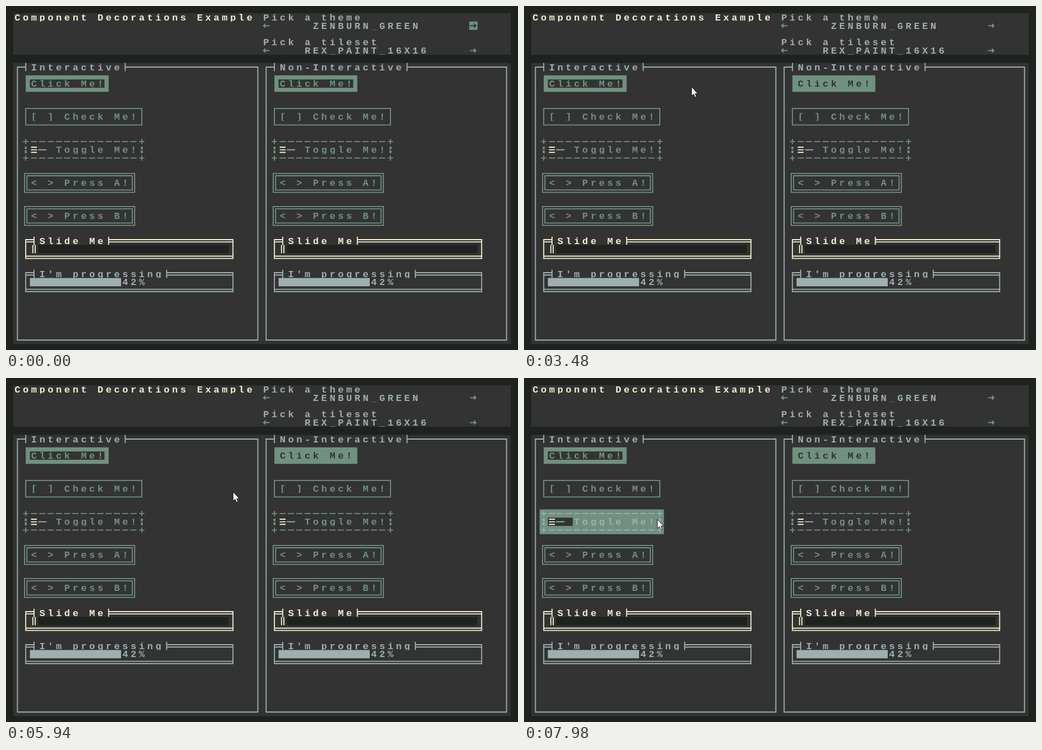
An HTML page that plays this animation: 912x614 px, repeating every 8000 ms.

```html
<!DOCTYPE html>
<html lang="en">
<head>
<meta charset="utf-8">
<title>Component Decorations Example</title>
<style>
  html, body { margin: 0; width: 100%; height: 100%; overflow: hidden; background: #1e2320; }
  svg { display: block; }
  text { font: bold 17px "Liberation Mono", "DejaVu Sans Mono", monospace; letter-spacing: 4.566px; }
</style>
</head>
<body>
<svg id="stage" width="912" height="614" viewBox="0 0 912 614"></svg>
<script>
const LOOP = 8000, STEP = 30;
const CELL = 14.766, ORIGIN = 13, LINE = 1.85, GAP = 2.1;
const BG = '#333333', DARK = '#1e2320', GREEN = '#709080', GRAY = '#9fafaf', CREAM = '#f0efd0';
const PRESS = 2460, RELEASE = 2580;

const stage = document.getElementById('stage');
const at = n => ORIGIN + n * CELL;
const mid = n => at(n + 0.5);

function el(tag, attrs, parent = stage) {
  const node = document.createElementNS('http://www.w3.org/2000/svg', tag);
  for (const key in attrs) node.setAttribute(key, attrs[key]);
  return parent.appendChild(node);
}

const fill = (node, color) => node.setAttribute('fill', color);
const stroke = (node, color) => node.setAttribute('stroke', color);

function block(col, row, w, h, color) {
  return el('rect', { x: at(col), y: at(row), width: w * CELL, height: h * CELL, fill: color });
}

// One line of text, cut off at the edges of its row.
function label(str, col, row, color) {
  const clip = el('svg', { x: at(col), y: at(row), width: str.length * CELL, height: CELL });
  const node = el('text', { x: 2.28, y: 12.9, fill: color }, clip);
  node.textContent = str;
  return node;
}

function path(d, color, width = LINE) {
  return el('path', { d, fill: 'none', stroke: color, 'stroke-width': width });
}

const boxPath = (x0, y0, x1, y1) => `M${x0} ${y0}H${x1}V${y1}H${x0}Z`;

function singleBox(c0, r0, c1, r1, color) {
  return path(boxPath(mid(c0), mid(r0), mid(c1), mid(r1)), color);
}

function doubleBox(c0, r0, c1, r1, color) {
  const grown = g => boxPath(mid(c0) - g, mid(r0) - g, mid(c1) + g, mid(r1) + g);
  path(grown(GAP) + grown(-GAP), color);
}

// Frame with a bracketed title in its top edge; offsets give its horizontal lines.
function titledBox(title, c0, r0, c1, r1, offsets, color) {
  const open = offsets.length > 1 ? c0 + 1 : c0 + 1;
  const close = open + title.length + 1;
  const top = mid(r0), bottom = mid(r1), last = offsets[offsets.length - 1];
  let d = `M${mid(open)} ${at(r0)}v${CELL}M${mid(close)} ${at(r0)}v${CELL}`;
  for (const x of [mid(c0), mid(c1)])
    d += `M${x} ${top + offsets[0] - LINE / 2}V${bottom + last + LINE / 2}`;
  for (const o of offsets)
    d += `M${mid(c0)} ${top + o}H${mid(open)}M${mid(close)} ${top + o}H${mid(c1)}` +
         `M${mid(c0)} ${bottom + o}H${mid(c1)}`;
  path(d, color);
  label(title, open + 1, r0, color);
}

function arrow(col, row, dir, color) {
  return el('path', {
    d: 'M6 0L1 -4.6V-1H-6V1H1V4.6Z',
    transform: `translate(${mid(col)} ${mid(row)}) scale(${dir} 1)`,
    fill: color
  });
}

const inside = (p, col, row, w, h) =>
  p && p.x >= at(col) && p.x < at(col + w) && p.y >= at(row) && p.y < at(row + h);

function clickButton(c, full) {
  const frame = block(c + 1.5, 7.5, 10, 2, GREEN);
  const inner = block(c + 2, 8, 9, 1, BG);
  const text = label('Click Me!', c + 2, 8, GREEN);
  return (p, t) => {
    const over = inside(p, c + 1, 7, 11, 3);
    const focused = !full && t >= PRESS;
    const pressed = focused && t < RELEASE;
    fill(frame, full && over ? GRAY : GREEN);
    fill(inner, over || focused ? GREEN : BG);
    fill(text, over && !pressed ? GRAY : focused ? BG : GREEN);
  };
}

function checkBox(c, full) {
  const back = full ? block(c + 1, 11, 15, 3, 'none') : block(c + 2, 12, 13, 1, 'none');
  const frame = singleBox(c + 1, 11, c + 15, 13, GREEN);
  const text = label('[ ] Check Me!', c + 2, 12, GREEN);
  return p => {
    const over = inside(p, c + 1, 11, 15, 3);
    fill(back, over ? GREEN : 'none');
    stroke(frame, over && full ? GRAY : GREEN);
    fill(text, over ? GRAY : GREEN);
  };
}

function toggle(c, full) {
  const back = full ? block(c + 1, 15, 15, 3, 'none') : block(c + 5, 16, 10, 1, 'none');
  block(c + 2, 16, 3, 1, BG);
  let edges = '', bars = '';
  for (const row of [15, 17]) {
    for (let i = 2; i < 15; i++) edges += `M${at(c + i) + 1.9} ${mid(row)}h11`;
    for (const col of [c + 1, c + 15])
      edges += `M${mid(col) - 4.6} ${mid(row)}h9.2M${mid(col)} ${mid(row) - 4.6}v9.2`;
  }
  for (const col of [c + 1, c + 15])
    bars += `M${mid(col)} ${at(16) + 1.8}v4.8M${mid(col)} ${at(16) + 8.6}v4.8`;
  const deco = [path(edges, GREEN), path(bars, GREEN, 3.6)];
  const x = at(c + 2) + 2, y = mid(16);
  path(`M${x} ${y - 4.6}h10.6M${x} ${y}h10.6M${x} ${y + 4.6}h10.6`, CREAM);
  path(`M${at(c + 3)} ${y}h${CELL}`, GRAY);
  const text = label('Toggle Me!', c + 5, 16, GREEN);
  return p => {
    const over = inside(p, c + 1, 15, 15, 3);
    fill(back, over ? GREEN : 'none');
    deco.forEach(d => stroke(d, over && full ? GRAY : GREEN));
    fill(text, over ? GRAY : GREEN);
  };
}

function panel(c, title, full) {
  titledBox(title, c, 6, c + 29, 39, [0], GRAY);
  const widgets = [clickButton(c, full), checkBox(c, full), toggle(c, full)];

  doubleBox(c + 1, 19, c + 14, 21, GREEN);
  label('< > Press A!', c + 2, 20, GREEN);
  doubleBox(c + 1, 23, c + 14, 25, GREEN);
  label('< > Press B!', c + 2, 24, GREEN);

  titledBox('Slide Me', c + 1, 27, c + 26, 29, [-GAP, GAP], CREAM);
  block(c + 3, 28, 23, 1, DARK);
  path(`M${mid(c + 2) - GAP} ${at(28)}v${CELL}M${mid(c + 2) + GAP} ${at(28)}v${CELL}`, CREAM);

  titledBox("I'm progressing", c + 1, 31, c + 26, 33, [-GAP, GAP], GRAY);
  block(c + 2, 32, 11, 1, GRAY);
  label('42%', c + 13, 32, GRAY);
  return widgets;
}

el('rect', { width: 912, height: 614, fill: DARK });
block(0, 0, 60, 5, BG);
block(0, 6, 60, 34, BG);

label('Component Decorations Example', 0, 0, CREAM);
label('Pick a theme', 30, 0, GRAY);
label('ZENBURN_GREEN', 36, 1, GRAY);
label('Pick a tileset', 30, 3, GRAY);
label('REX_PAINT_16X16', 35, 4, GRAY);
const nextBack = block(55, 1, 1, 1, GREEN);
arrow(30, 1, -1, GREEN);
arrow(30, 4, -1, GREEN);
arrow(55, 4, 1, GREEN);
const next = arrow(55, 1, 1, BG);

const widgets = [...panel(0, 'Interactive', true), ...panel(30, 'Non-Interactive', false)];

const cursor = el('path', {
  d: 'M0 0V16L3.7 12.7L6.2 18.4L8.7 17.3L6.3 11.7H11Z',
  fill: '#ffffff', stroke: '#111111', 'stroke-width': 0.9, 'stroke-linejoin': 'round'
});

// Pointer track: time, x, y
const track = [
  [240, 918, 52], [450, 791, 175], [810, 791, 175],
  [1500, 569, 136], [2970, 569, 136],
  [3480, 298, 144], [3780, 157, 144], [3870, 150, 144], [4110, 150, 144],
  [4260, 202, 144], [4410, 209, 144], [4650, 209, 144],
  [5040, 212, 203], [5400, 212, 203],
  [5940, 404, 203], [6210, 547, 207], [6270, 558, 208], [6510, 558, 208],
  [6810, 448, 236], [7140, 512, 258], [7410, 512, 258],
  [7980, 237, 252]
];

const slope = (i, k) =>
  track[i] && track[i + 1] ? (track[i + 1][k] - track[i][k]) / (track[i + 1][0] - track[i][0]) : 0;

// Monotone tangent: zero at rests and turning points.
function tangent(i, k) {
  const a = slope(i - 1, k), b = slope(i, k);
  return a * b > 0 ? 2 * a * b / (a + b) : 0;
}

function pointer(t) {
  if (t < 270) return null;
  let i = 0;
  while (i < track.length - 2 && t >= track[i + 1][0]) i++;
  const a = track[i], b = track[i + 1], span = b[0] - a[0];
  const u = Math.min(1, (t - a[0]) / span), v = 1 - u;
  const along = k => Math.round(
    a[k] * v * v * (1 + 2 * u) + b[k] * u * u * (1 + 2 * v) +
    span * u * v * (tangent(i, k) * v - tangent(i + 1, k) * u));
  return { x: along(1), y: along(2) };
}

function draw(time) {
  const t = Math.floor((time % LOOP) / STEP) * STEP;
  const p = pointer(t);
  const themeFocused = t < PRESS;
  fill(nextBack, themeFocused ? GREEN : BG);
  fill(next, themeFocused ? BG : GREEN);
  widgets.forEach(update => update(p, t));
  cursor.setAttribute('visibility', p ? 'visible' : 'hidden');
  if (p) cursor.setAttribute('transform', `translate(${p.x + 0.5} ${p.y + 0.5})`);
}

const start = performance.now();
function tick() {
  draw(performance.now() - start);
  requestAnimationFrame(tick);
}
tick();
</script>
</body>
</html>
```
